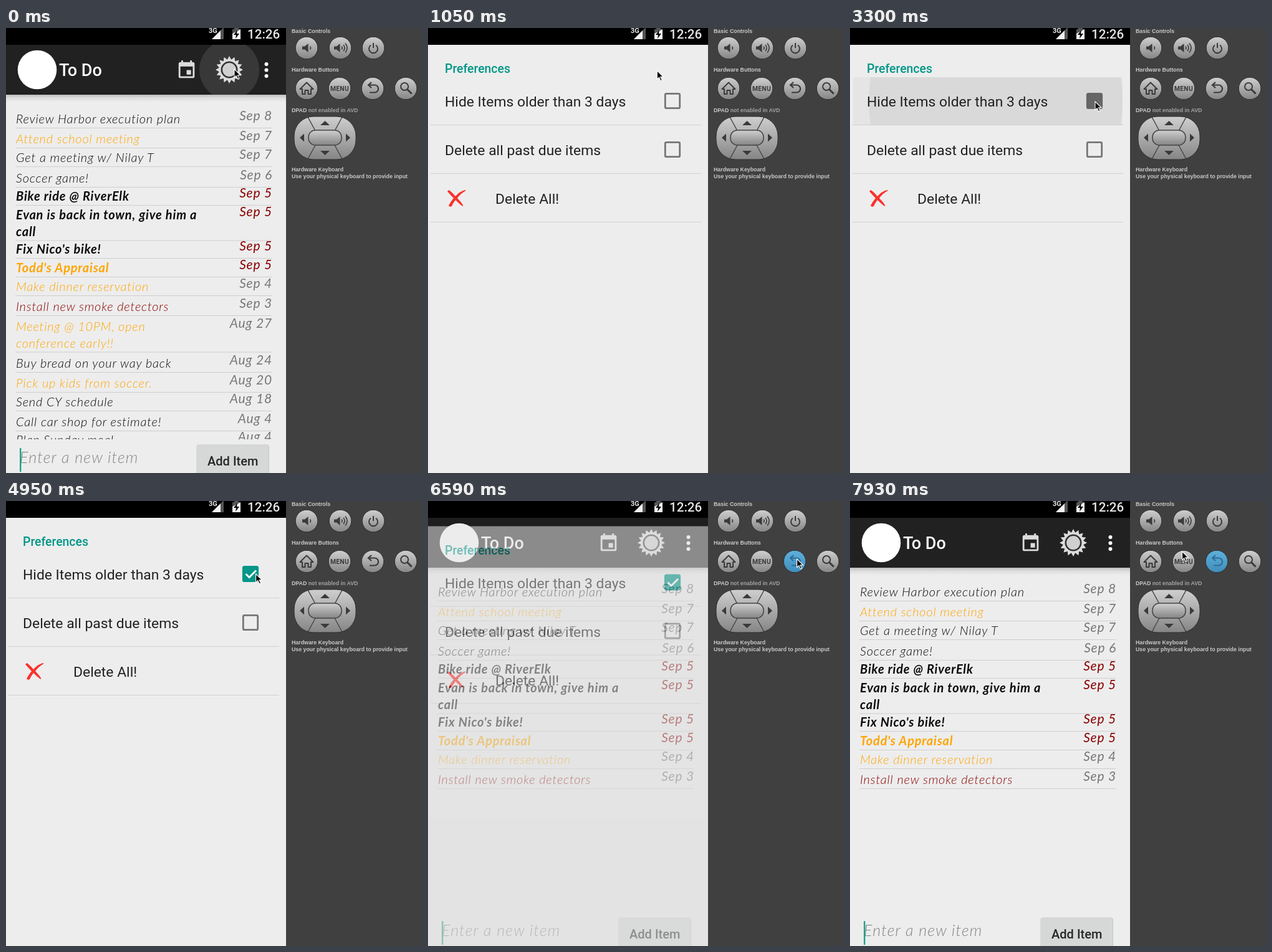
An HTML page that plays this animation: 667 px wide and 714 px high, repeating every 8000 ms.

```html
<!DOCTYPE html>
<html lang="en">
<head>
<meta charset="utf-8">
<title>To Do</title>
<style>
html, body { margin: 0; width: 100%; height: 100%; overflow: hidden; background: #404040; }
svg { display: block; width: 667px; height: 714px; }
text { font-family: Roboto, sans-serif; white-space: pre; }
.hand { font: italic 300 20px Lato, sans-serif; letter-spacing: .8px; }
.hand.bold { font-weight: 700; }
.date { font-size: 21px; font-weight: 400; text-anchor: end; }
.pref { font-size: 22.9px; fill: #212121; }
.panel { font: bold 8.8px "Liberation Sans", Arial, sans-serif; fill: #c8c8c8; }
</style>
</head>
<body>
<svg viewBox="0 0 667 714">
  <defs>
    <linearGradient id="shade" x2="0" y2="1">
      <stop stop-color="#bdbdbd"/><stop offset=".45" stop-color="#dedede"/><stop offset="1" stop-color="#ededed"/>
    </linearGradient>
    <linearGradient id="metal" x2="0" y2="1">
      <stop stop-color="#cfcfcf"/><stop offset="1" stop-color="#858585"/>
    </linearGradient>
    <linearGradient id="blue" x2="0" y2="1">
      <stop stop-color="#5fb0dc"/><stop offset="1" stop-color="#3f8dbb"/>
    </linearGradient>
    <clipPath id="barClip"><path d="M0 27H449V107H0z"/></clipPath>
    <clipPath id="listClip"><path d="M0 107H449V660H0z"/></clipPath>
    <clipPath id="phoneClip"><path d="M0 0H449V714H0z"/></clipPath>
    <clipPath id="padClip"><rect x="462" y="142" width="99" height="69" rx="31"/></clipPath>
  </defs>

  <g clip-path="url(#phoneClip)">
    <path d="M0 27H449V714H0z" fill="#ededed"/>
    <path d="M0 107H449V119H0z" fill="url(#shade)"/>
    <g clip-path="url(#listClip)"><g id="recent"/><g id="old"/></g>
    <text class="hand" x="22" y="698" fill="#858585" style="font-size:25px;letter-spacing:1.2px">Enter a new item</text>
    <path id="caret" d="M22 674h2.4v38H22z" fill="#1aa48c"/>
    <rect x="305.5" y="669" width="116.5" height="50" rx="3" fill="#c6c7c7"/>
    <rect x="306" y="668" width="115" height="50" rx="3" fill="#d6d7d7"/>
    <text x="323" y="702" font-size="20" font-weight="500" fill="#272727">Add Item</text>

    <path d="M0 27H449V107H0z" fill="#212121"/>
    <g clip-path="url(#barClip)"><circle id="barRipple" cx="358" cy="67" r="48" fill="#383838"/></g>
    <circle cx="50" cy="67" r="31.3" fill="#fff"/>
    <text x="85" y="77" font-size="27" font-weight="500" fill="#fff">To Do</text>
    <path transform="translate(272.5 50.5) scale(1.42)" fill="#dcdcdc" d="M17 12h-5v5h5zM16 1v2H8V1H6v2H5a2 2 0 0 0-2 2v14a2 2 0 0 0 2 2h14a2 2 0 0 0 2-2V5a2 2 0 0 0-2-2h-1V1zm3 18H5V8h14z"/>
    <path id="rays" fill="#dcdcdc"/>
    <circle cx="358" cy="67" r="12.2" fill="#d0d0d0" stroke="#333" stroke-width="2.6"/>
    <g fill="#fff"><circle cx="417.5" cy="58" r="3"/><circle cx="417.5" cy="67.5" r="3"/><circle cx="417.5" cy="77" r="3"/></g>
    <path id="dim" d="M0 27H449V714H0z"/>

    <g id="prefs">
      <path d="M0 27H449V760H0z" fill="#ededed"/>
      <path id="rowTint" d="M5 79H437V155H5z" fill="#e5e5e5"/>
      <path id="rowRipple" d="M33 79H434Q440 117 434 155H33Q27 117 33 79z" fill="#d9d9d9"/>
      <text x="27" y="72" font-size="19.4" font-weight="500" fill="#009688">Preferences</text>
      <text class="pref" x="27" y="126">Hide Items older than 3 days</text>
      <text class="pref" x="27" y="204">Delete all past due items</text>
      <text class="pref" x="108" y="282">Delete All!</text>
      <path d="M4 155.5H438M4 233.5H438M4 311.5H438" stroke="#d0d0d0"/>
      <rect id="box" x="380.3" y="105.3" width="23.4" height="23.4" rx="2" stroke-width="2.8"/>
      <path id="tick" d="M384.5 117l5.5 5.5 11-11" fill="none" stroke="#fff" stroke-width="2.7"/>
      <rect x="380.3" y="183.3" width="23.4" height="23.4" rx="2" fill="none" stroke="#757575" stroke-width="2.8"/>
      <path fill="#f9322c" d="M31 262q2-3 4-1q5 4 9 9q7-8 15-10q3 0 0 2q-7 4-12 11q6 6 9 11q1 3-2 1q-5-4-10-9q-4 5-6 10q-3 2-5-1q3-6 8-12q-5-5-10-11z"/>
    </g>

    <path d="M0 0H449V27H0z" fill="#000"/>
    <text x="325" y="8" font-size="11" font-weight="700" fill="#e8e8e8">3G</text>
    <path d="M349 -1V18H330z" fill="#555"/>
    <path d="M344 4V18H330z" fill="#f2f2f2"/>
    <path d="M363 2h3V0h7v2h3v16h-13z" fill="#555"/>
    <path d="M363 9l13-7v16h-13z" fill="#f2f2f2"/>
    <path d="M371 3l-6 8h4l-1 6 6-8h-4z" fill="#000"/>
    <text x="387" y="17" font-size="20.6" font-weight="500" fill="#e6e6e6">12:26</text>
  </g>

  <path d="M449 0H667V714H449z" fill="#404040"/>
  <text class="panel" x="458" y="8">Basic Controls</text>
  <text class="panel" x="458" y="70">Hardware Buttons</text>
  <text class="panel" x="458" y="134.5">DPAD <tspan fill="#a2a2a2">not enabled in AVD</tspan></text>
  <text class="panel" x="458" y="230">Hardware Keyboard</text>
  <text class="panel" x="458" y="241">Use your physical keyboard to provide input</text>
  <g id="buttons"></g>
  <g fill="none" stroke="#3a3a3a" stroke-width="2" stroke-linejoin="round">
    <path d="M475 29.5h4l5.5-4.5v14l-5.5-4.5h-4zM526 29.5h4l5.5-4.5v14l-5.5-4.5h-4z" fill="#3a3a3a" stroke="none"/>
    <path d="M487.5 29.5q2 2.5 0 5M538 29.5q2 2.5 0 5M541 27q4 5 0 10M544 24.5q6 7.5 0 15" stroke-width="1.6"/>
    <path d="M585 27.5a7 7 0 1 0 8 0M589 24v8"/>
    <path d="M471.5 98l10.5-10.5L492.5 98H489v8h-4.5v-6h-5v6H475v-8z"/>
    <circle cx="639" cy="94" r="6"/><path d="M643.5 98.5l7 7" stroke-width="3"/>
  </g>
  <path id="backIcon" d="M586 87l-5 4.5 5 4.5M581.5 91.5H591a6 6 0 0 1 0 12h-8" fill="none" stroke-width="2.2"/>
  <text x="535" y="101" text-anchor="middle" font-size="10.3" font-weight="700" fill="#3a3a3a" letter-spacing=".3">MENU</text>
  <g clip-path="url(#padClip)">
    <path d="M462 142h99v69h-99z" fill="url(#metal)"/>
    <path d="M483 141l13 24M540 141l-13 24M483 212l13-24M540 212l-13-24" stroke="#4a4a4a" stroke-width="1.5"/>
  </g>
  <rect x="462" y="142" width="99" height="69" rx="31" fill="none" stroke="#2d2d2d"/>
  <rect x="485" y="164" width="53" height="24" rx="11" fill="url(#metal)" stroke="#444" stroke-width="1.5"/>
  <path d="M504 156l7.5-7 7.5 7zM504 197l7.5 7 7.5-7zM478 169.5l-7 6.5 7 6.5zM545 169.5l7 6.5-7 6.5z" fill="#3a3a3a"/>
  <path id="pointer" d="M0 0V13.5l3.2-2.9 2.5 5.5 2.3-1-2.5-5.3H10z" fill="#000" stroke="#fff" stroke-width="1.1"/>
</svg>
<script>
const $ = id => document.getElementById(id);
const set = (id, attrs) => { for (const k in attrs) $(id).setAttribute(k, attrs[k]); };
const show = (id, on) => set(id, { visibility: on ? 'visible' : 'hidden' });

const BLACK = '#0a0a0a', ORANGE = '#ffa500', RED = '#8b0000', GREY = '#777';
// text, date, baseline, colour, bold
const rows = [
  ['Review Harbor execution plan', 'Sep 8', 153, BLACK],
  ['Attend school meeting', 'Sep 7', 185, ORANGE],
  ['Get a meeting w/ Nilay T', 'Sep 7', 215, BLACK],
  ['Soccer game!', 'Sep 6', 248, BLACK],
  ['Bike ride @ RiverElk', 'Sep 5', 277, BLACK, true],
  ['Evan is back in town, give him a\ncall', 'Sep 5', 307, BLACK, true],
  ["Fix Nico's bike!", 'Sep 5', 362, BLACK, true],
  ["Todd's Appraisal", 'Sep 5', 392, ORANGE, true],
  ['Make dinner reservation', 'Sep 4', 422, ORANGE],
  ['Install new smoke detectors', 'Sep 3', 454, RED],
  ['Meeting @ 10PM, open\nconference early!!', 'Aug 27', 486, ORANGE],
  ['Buy bread on your way back', 'Aug 24', 545, BLACK],
  ['Pick up kids from soccer.', 'Aug 20', 577, ORANGE],
  ['Send CY schedule', 'Aug 18', 607, BLACK],
  ['Call car shop for estimate!', 'Aug 4', 639, BLACK],
  ['Plan Sunday meal', 'Aug 4', 668, BLACK]
];
const rowSvg = ([text, date, y, color, bold]) => {
  const lines = text.split('\n');
  const end = y + 7.5 + (lines.length - 1) * 26.5;
  return lines.map((s, i) =>
    `<text class="hand${bold ? ' bold' : ''}" x="16" y="${y + i * 26.5}" fill="${color}">${s}</text>`).join('') +
    `<text class="hand date" x="427" y="${y - 5}" fill="${date === 'Sep 5' ? RED : GREY}">${date}</text>` +
    `<path d="M15 ${end}H426" stroke="#cecece"/>`;
};
$('recent').innerHTML = rows.slice(0, 10).map(rowSvg).join('');
$('old').innerHTML = rows.slice(10).map(rowSvg).join('');

const RAYS = 16;
set('rays', {
  d: 'M' + Array.from({ length: RAYS * 2 }, (_, i) => {
    const a = i * Math.PI / RAYS, r = i % 2 ? 16.5 : 22;
    return (358 + r * Math.sin(a)).toFixed(1) + ' ' + (67 - r * Math.cos(a)).toFixed(1);
  }).join('L') + 'z'
});

$('buttons').innerHTML = [[482, 32], [536, 32], [589, 32], [482, 97], [535, 97], [588, 97], [641, 97]]
  .map(([x, y]) => `<circle${x === 588 ? ' id="back"' : ''} cx="${x}" cy="${y}" r="17.8" fill="url(#metal)" stroke="#2f2f2f"/>`)
  .join('');

// start, steps, step length, destination
const moves = [
  [1050, 7, 150, 393, 118],
  [4950, 8, 148.5, 591.5, 93],
  [7780, 2, 150, 532.5, 81]
];
function pointerAt(t) {
  let x = 366, y = 66;
  for (const [start, steps, len, tx, ty] of moves) {
    if (t < start) break;
    const p = Math.min(1, (Math.floor((t - start) / len + 1e-6) + 1) / steps);
    const e = (1 - Math.cos(Math.PI * p)) / 2;
    x += (tx - x) * e;
    y += (ty - y) * e;
  }
  return [x, y];
}

// vertical offset and opacity of the preferences sheet
function sheetAt(t) {
  if (t < 150 || t >= 6730) return [0, 0];
  if (t < 300) return [4, 1];
  if (t < 6290) return [0, 1];
  if (t < 6440) return [1, 1];
  if (t < 6590) return [4.5, 0.9];
  return [13.5, 0.53];
}

function draw(t) {
  const [dy, alpha] = sheetAt(t);
  set('prefs', { transform: `translate(0 ${dy})`, opacity: alpha });
  show('prefs', alpha > 0);
  show('barRipple', t < 3300);
  show('old', t < 3300);
  set('dim', { opacity: t >= 6290 && t < 6730 ? 0.08 : 0 });
  show('caret', t < 7030 || t >= 7480);

  const pressed = t >= 3300 && t < 3600, checked = t >= 3450;
  const tint = pressed ? (checked ? 0.4 : 1) : 0;
  set('rowTint', { opacity: tint });
  set('rowRipple', { opacity: tint });
  const ink = checked ? '#009688' : pressed ? '#666' : '#757575';
  set('box', { stroke: ink, fill: t >= 3300 ? ink : 'none' });
  set('tick', { opacity: checked ? 1 : 0 });

  const hot = t >= 5985;
  set('back', { fill: hot ? 'url(#blue)' : 'url(#metal)' });
  set('backIcon', { stroke: hot ? '#2f6d95' : '#3a3a3a' });
  const [x, y] = pointerAt(t);
  set('pointer', { transform: `translate(${x.toFixed(1)} ${y.toFixed(1)})` });
}

const frame = () => {
  draw(performance.now() % 8000);
  requestAnimationFrame(frame);
};
frame();
</script>
</body>
</html>
```
